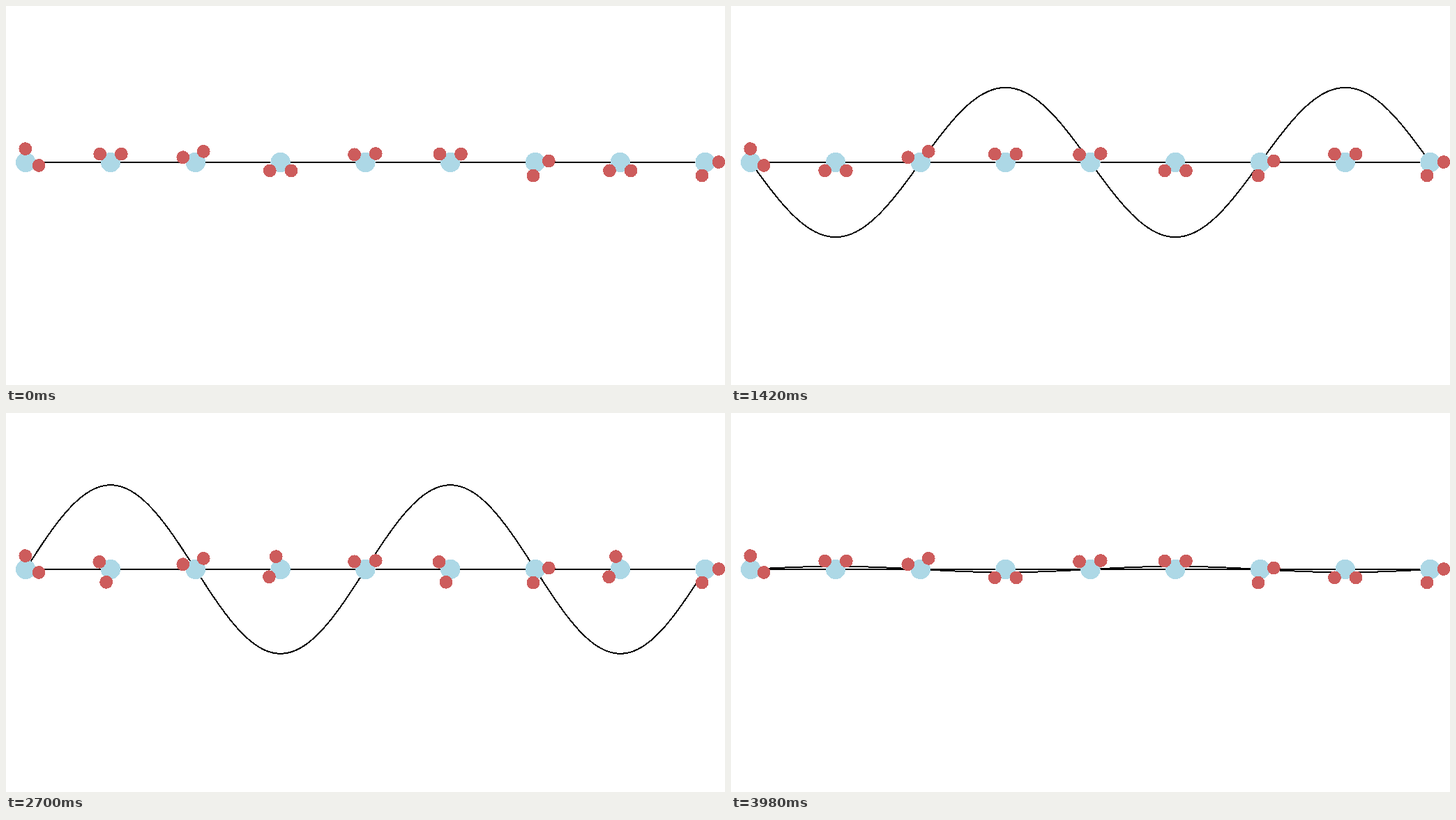
Animation of 1031x543 px, one loop 4000 ms. Source, as an HTML page:

```html
<!DOCTYPE html>
<html lang="en">
<head>
<meta charset="utf-8">
<title>Dipoles in a standing wave</title>
<style>
  html, body { margin: 0; width: 100%; height: 100%; overflow: hidden; background: #fff; }
  svg { display: block; width: 1031px; height: 543px; }
  path { fill: none; stroke: #000; stroke-width: 2; }
  .core { fill: #add8e6; }
  .atom { fill: #cd5c5c; }
</style>
</head>
<body>
<svg viewBox="0 0 1031 543" shape-rendering="crispEdges">
  <path id="axis"/>
  <path id="wave"/>
</svg>
<script>
const LEFT = 28.2, GAP = 121.8, MID = 224, AMPLITUDE = 135.5;
const STEP_MS = 20, STEPS = 200, HALF = STEPS / 2;
const TURN_RATE = 4;            // degrees per step at full field
const BOND = 19.4, HALF_ANGLE = 52.25;
// Resting directions of the molecules at the wave's nodes, in degrees
const NODE_ANGLES = [-39, -106, -92.5, 46.5, 51];

const svg = document.querySelector('svg');
const wave = document.getElementById('wave');
const field = step => Math.sin(2 * Math.PI * step / STEPS);

function addCircle(className, r) {
  const circle = document.createElementNS('http://www.w3.org/2000/svg', 'circle');
  circle.setAttribute('class', className);
  circle.setAttribute('r', r);
  svg.append(circle);
  return circle;
}

function place(circle, x, y) {
  circle.setAttribute('cx', x);
  circle.setAttribute('cy', y);
}

const molecules = Array.from({ length: 9 }, (_, i) => {
  const x = LEFT + i * GAP;
  place(addCircle('core', 14.2), x, MID);
  return { x, atoms: [addCircle('atom', 9.4), addCircle('atom', 9.4)] };
});

function aim({ x, atoms }, degrees) {
  atoms.forEach((atom, i) => {
    const a = (degrees + (i ? HALF_ANGLE : -HALF_ANGLE)) * Math.PI / 180;
    place(atom, x + BOND * Math.cos(a), MID + BOND * Math.sin(a));
  });
}

// Degrees turned since the field last changed sign, up to full alignment
function turned(step) {
  let sum = 0;
  for (let n = 1; n <= step % HALF; n++) sum += TURN_RATE * field(n);
  return Math.min(180, sum);
}

function wavePath(height) {
  let d = '';
  for (let x = 0; x <= 8 * GAP; x += GAP / 60) {
    const y = MID + height * Math.sin(x / GAP * Math.PI / 2);
    d += `${d ? 'L' : 'M'}${(LEFT + x).toFixed(2)} ${y.toFixed(2)}`;
  }
  return d;
}

function draw(now) {
  const step = Math.floor(now / STEP_MS) % STEPS;
  wave.setAttribute('d', wavePath(AMPLITUDE * field(step)));
  const angle = step < HALF ? 270 - turned(step) : 90 + turned(step);
  for (let i = 1; i < 9; i += 2) aim(molecules[i], i % 4 === 1 ? angle : -angle);
  requestAnimationFrame(draw);
}

document.getElementById('axis').setAttribute('d', `M${LEFT} ${MID}h${8 * GAP}`);
NODE_ANGLES.forEach((angle, i) => aim(molecules[2 * i], angle));
draw(0);
</script>
</body>
</html>
```
